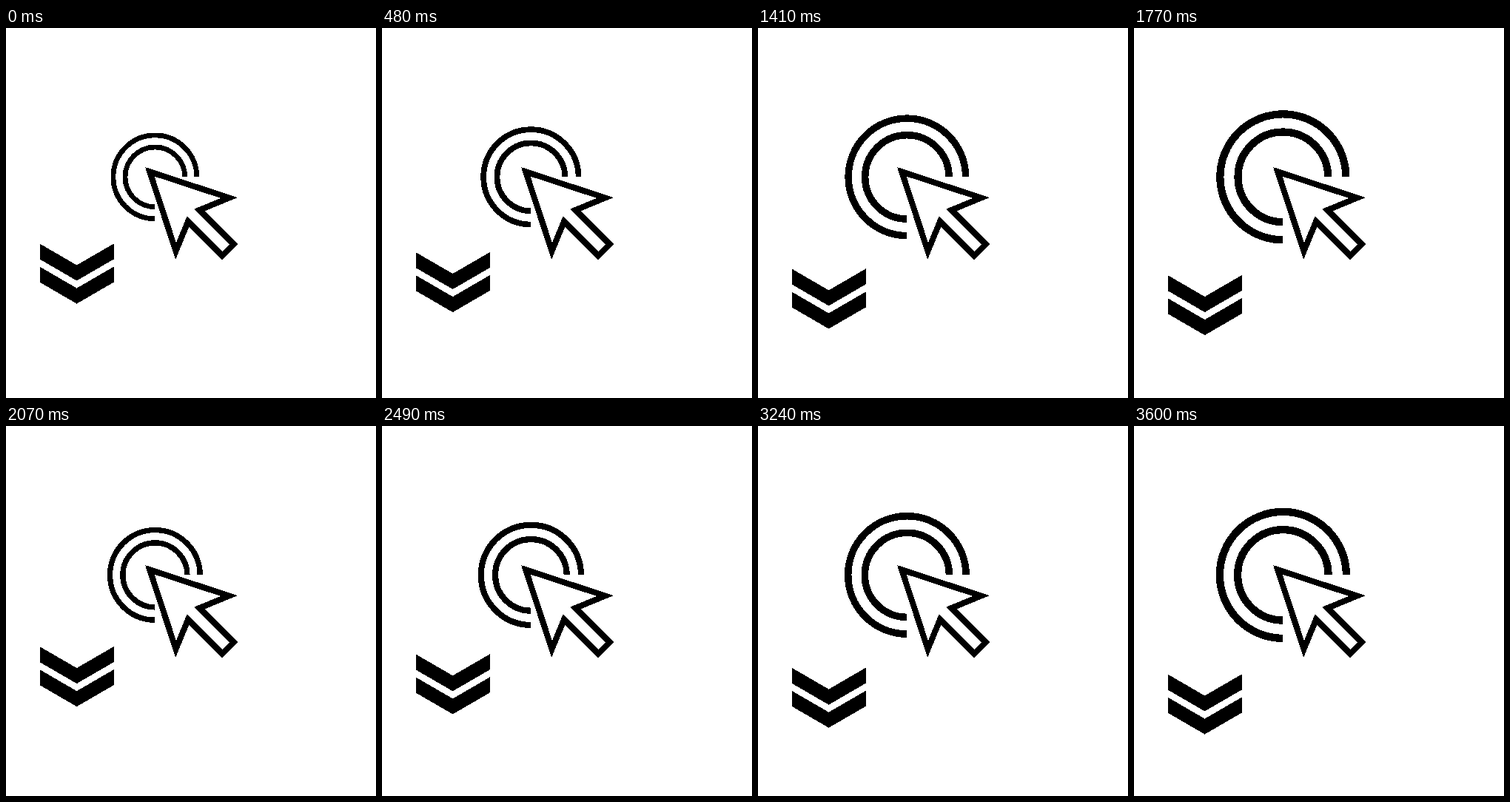
Write an HTML page that moves like this. It is 500 px wide and 500 px high and loops after 3.63 s.

```html
<!DOCTYPE html>
<html lang="en">
<head>
<meta charset="utf-8">
<title>Click and scroll</title>
<style>
  html, body { margin: 0; width: 100%; height: 100%; overflow: hidden; background: #fff; }
  svg { display: block; width: 500px; height: 500px; shape-rendering: crispEdges; }
  .line { fill: none; stroke: #000; stroke-miterlimit: 10; }
</style>
</head>
<body>
<svg viewBox="0 0 500 500">
  <!-- three-quarter rings, open towards the pointer -->
  <g id="rings" class="line" stroke-width="6.8">
    <path d="M0 56.45A56.45 56.45 0 1 1 56.45 0"/>
    <path d="M0 40.4A40.4 40.4 0 1 1 40.4 0"/>
  </g>
  <path class="line" stroke-width="8"
    d="M194.3 194.3L301.5 229.5L261.5 246L307.7 292.2L292.2 307.7L246 261.5L229.5 301.5Z"/>
  <g id="chevrons">
    <path id="band" d="M45.6 0L95.6 29L145.6 0V21L95.6 50L45.6 21Z"/>
    <use href="#band" y="31.1"/>
  </g>
</svg>
<script>
  const STEP = 30, LOOP = 3630, HALF = 60;
  const CENTER = 201.38, TOP = 291.48, GROWTH = 0.515;
  const DROPS = [43.28, 44];   // travel of the chevrons in each pass

  const rings = document.getElementById('rings');
  const chevrons = document.getElementById('chevrons');
  const start = performance.now();

  function draw(ms) {
    const step = Math.floor((ms % LOOP) / STEP);
    const pass = step < HALF ? 0 : 1;
    const p = (step - pass * HALF) / HALF;
    rings.setAttribute('transform',
      `translate(${CENTER} ${CENTER}) scale(${1 + GROWTH * p})`);
    chevrons.setAttribute('transform', `translate(0 ${TOP + DROPS[pass] * p})`);
  }

  function tick() {
    draw(performance.now() - start);
    requestAnimationFrame(tick);
  }
  tick();
</script>
</body>
</html>
```
